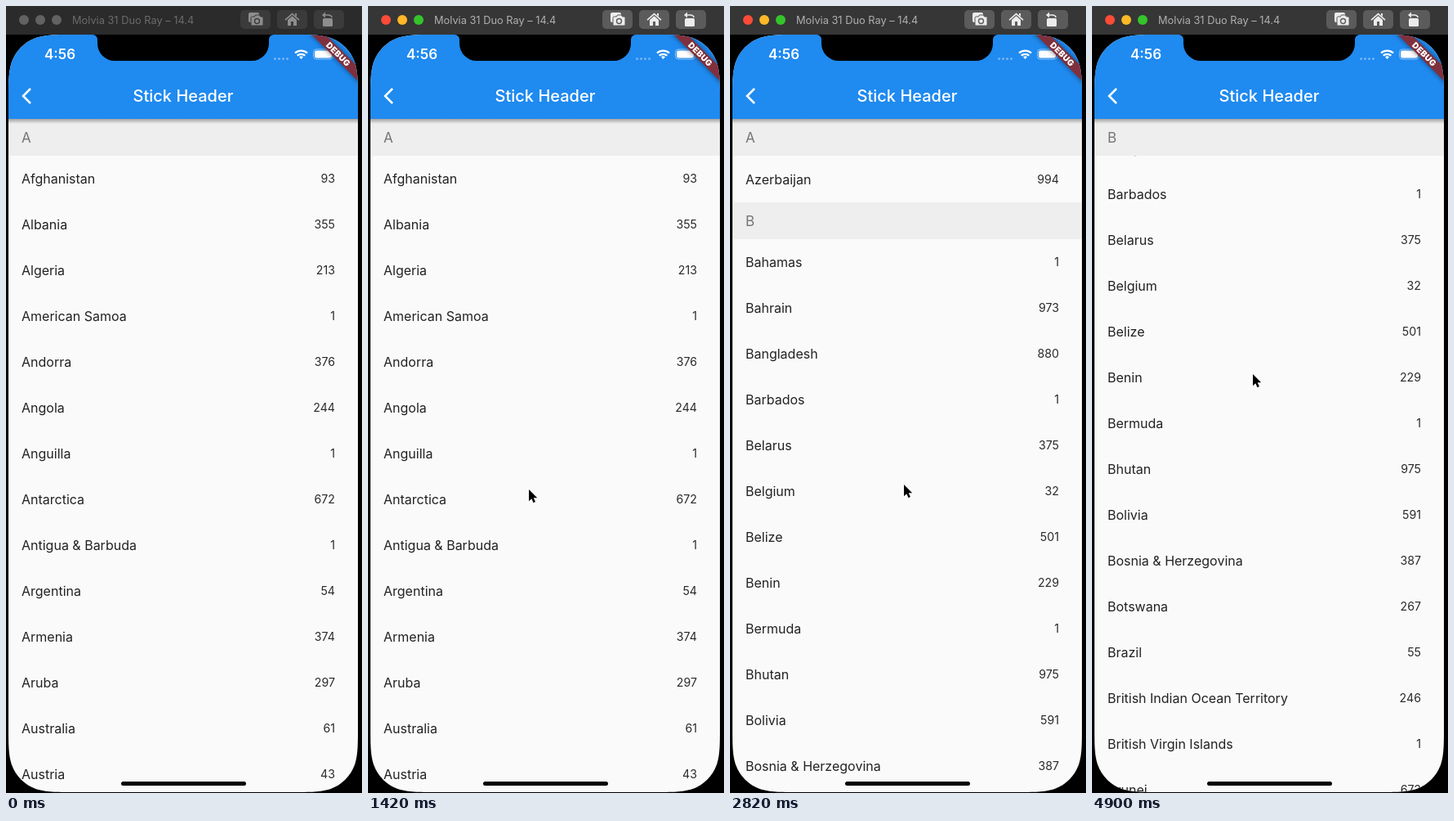
Recreate the animation shown at these times as an HTML page. Size 436x962 px, loop 4920 ms.

```html
<!DOCTYPE html>
<html lang="en">
<head>
<meta charset="utf-8">
<title>Stick Header</title>
<style>
html, body { margin: 0; width: 100%; height: 100%; overflow: hidden; background: #000; }
svg { display: block; width: 436px; height: 962px; font-family: Inter, "Liberation Sans", sans-serif; }
.name { font-size: 16px; fill: #222; }
.code { font-size: 14.2px; fill: #2a2a2a; text-anchor: end; }
.letter { font-size: 17px; fill: #757575; }
#bar { --bg: #363636; --btn: #5b5b5b; --icon: #ececec; --title: #b0b0b0; --r: #fc4b37; --y: #fdb827; --g: #35c42c; }
#bar.idle { --bg: #2b2b2b; --btn: #3b3b3b; --icon: #8e8e8e; --title: #6b6b6b; --r: #626262; --y: #626262; --g: #626262; }
#band { filter: drop-shadow(0 0 3px rgba(0, 0, 0, .5)); }
</style>
</head>
<body>
<svg viewBox="0 0 436 962">
  <defs>
    <clipPath id="screen"><path id="outline"/></clipPath>
    <linearGradient id="shade" x2="0" y2="1">
      <stop stop-color="#000" stop-opacity=".32"/>
      <stop offset="1" stop-color="#000" stop-opacity="0"/>
    </linearGradient>
  </defs>
  <rect width="436" height="962" fill="#000"/>

  <g id="bar" class="idle">
    <rect width="436" height="35" style="fill:var(--bg)"/>
    <circle cx="22" cy="17" r="6" style="fill:var(--r)"/>
    <circle cx="42" cy="17" r="6" style="fill:var(--y)"/>
    <circle cx="62" cy="17" r="6" style="fill:var(--g)"/>
    <text x="81" y="22" font-size="12.8" style="fill:var(--title)">Molvia 31 Duo Ray – 14.4</text>
    <g style="fill:var(--btn)">
      <rect x="287" y="5" width="37" height="23" rx="5"/>
      <rect x="332" y="5" width="37" height="23" rx="5"/>
      <rect x="377" y="5" width="37" height="23" rx="5"/>
    </g>
    <g style="fill:var(--icon)">
      <rect x="297" y="8" width="13" height="12" rx="2"/>
      <path d="M301.500 13h3l1-2h5l1 2h2q1.500 0 1.500 1.500v8q0 1.500-1.500 1.500h-12q-1.500 0-1.500-1.500v-8q0-1.500 1.500-1.500z" style="stroke:var(--btn)"/>
      <circle cx="307.500" cy="18.500" r="3" style="fill:none;stroke:var(--btn);stroke-width:1.400"/>
      <path d="M350.500 8.500l9 8-1 1.200-8-7-8 7-1-1.200z M345 17l5.500-4.800 5.500 4.800v7h-4v-5h-3v5h-4z M354 9h2v4l-2-2z"/>
      <rect x="388" y="15" width="12" height="10" rx="1.500"/>
      <path d="M391 7.500v7l-4-3.500z"/>
      <path d="M390 11h4q5 0 5 3" style="fill:none;stroke:var(--icon);stroke-width:1.600"/>
    </g>
  </g>

  <g clip-path="url(#screen)">
    <rect y="35" width="436" height="927" fill="#fafafa"/>
    <g id="list"></g>
    <g id="heads"></g>
    <rect y="138" width="436" height="6" fill="url(#shade)"/>
    <rect y="35" width="436" height="103" fill="#1f8af0"/>
    <path d="M106 35a6 6 0 0 1 6 6v5a21 21 0 0 0 21 21h168a21 21 0 0 0 21-21v-5a6 6 0 0 1 6-6z" fill="#000"/>
    <text x="47" y="65" font-size="17" font-weight="600" fill="#fff">4:56</text>
    <g fill="#74b5f5">
      <circle cx="329.500" cy="64.500" r="1.500"/><circle cx="334.500" cy="64.500" r="1.500"/>
      <circle cx="339.500" cy="64.500" r="1.500"/><circle cx="344.500" cy="64.500" r="1.500"/>
    </g>
    <g fill="none" stroke="#fff" stroke-width="2.300">
      <path d="M354 57.500a11 11 0 0 1 15 0M356.700 60.700a7 7 0 0 1 9.600 0"/>
      <path d="M359 62.200q2.500-1.800 5 0l-2.500 2.800z" fill="#fff" stroke="none"/>
    </g>
    <rect x="376.500" y="53" width="24" height="12" rx="3.500" fill="none" stroke="#8fc4f7"/>
    <rect x="378" y="54.500" width="21" height="9" rx="2.200" fill="#fff"/>
    <g transform="translate(431 35) rotate(45)">
      <rect id="band" x="-60" y="28" width="120" height="12" fill="#80303c"/>
      <text y="37.600" font-size="10.200" font-weight="900" letter-spacing=".3" text-anchor="middle" fill="#fff">DEBUG</text>
    </g>
    <path d="M30 101l-9 9 9 9" fill="none" stroke="#fff" stroke-width="2.600"/>
    <text x="217" y="117" font-size="20" font-weight="500" text-anchor="middle" fill="#fff">Stick Header</text>
    <rect x="141" y="948" width="153" height="5" rx="2.500" fill="#000"/>
  </g>
  <path id="cursor" d="M0 0V14.300L3.300 11.200 5.500 16.200 7.900 15.100 5.700 10.300H10.200Z" fill="#000" stroke="#fff" stroke-width="1" paint-order="stroke"/>
</svg>
<script>
const TOP = 138, HEAD = 45, ROW = 56, LOOP = 4920;
const data = {
  A: "Afghanistan:93|Albania:355|Algeria:213|American Samoa:1|Andorra:376|Angola:244|Anguilla:1|" +
     "Antarctica:672|Antigua &amp; Barbuda:1|Argentina:54|Armenia:374|Aruba:297|Australia:61|Austria:43|Azerbaijan:994",
  B: "Bahamas:1|Bahrain:973|Bangladesh:880|Barbados:1|Belarus:375|Belgium:32|Belize:501|Benin:229|" +
     "Bermuda:1|Bhutan:975|Bolivia:591|Bosnia &amp; Herzegovina:387|Botswana:267|Brazil:55|" +
     "British Indian Ocean Territory:246|British Virgin Islands:1|Brunei:673"
};
const $ = id => document.getElementById(id);

// Rounded screen with continuous corners
const bend = [[1.53, 0], [1.09, 0], [.87, 0], [.63, .075], [.37, .17], [.17, .37], [.075, .63], [0, .87], [0, 1.09], [0, 1.53]];
function corner(x, y, sx, sy) {
  const points = bend.map(([a, b]) => `${x + sx * a * 53} ${y + sy * b * 53}`);
  if (sx === sy) points.reverse();
  return `L${points[0]} C${points.slice(1).join(" ")}`;
}
const outline = corner(3, 35, 1, 1) + corner(431, 35, -1, 1) + corner(431, 961, -1, -1) + corner(3, 961, 1, -1);
$("outline").setAttribute("d", outline.replace("L", "M") + "Z");

let y = TOP, rows = "", heads = "";
const sections = Object.entries(data).map(([letter, text]) => {
  const top = y;
  y += HEAD;
  for (const item of text.split("|")) {
    const [name, code] = item.split(":");
    rows += `<text class="name" x="19" y="${y + 33.7}">${name}</text><text class="code" x="403" y="${y + 33}">${code}</text>`;
    y += ROW;
  }
  heads += `<g><rect width="436" height="${HEAD}" fill="#eee"/><text class="letter" x="19" y="29">${letter}</text></g>`;
  return { top, bottom: y };
});
$("list").innerHTML = rows;
$("heads").innerHTML = heads;

// Keys: [step, value]
const scrollKeys = [[4, 0], [23, -103], [31, 0], [38, 169], [49, 493.5], [61, 783], [79, 995.5], [93, 1034]];
const cursorX = [[0, 440], [5, 200], [23, 190], [38, 206], [49, 214], [61, 213], [79, 208], [105, 197]];
const cursorY = [[0, 300], [5, 418], [23, 658], [38, 491], [43, 420], [49, 534], [55, 470], [61, 585], [79, 381], [100, 450]];

// Monotone cubic through the keys
function curve(keys, n) {
  const last = keys.length - 1;
  if (n <= keys[0][0]) return keys[0][1];
  if (n >= keys[last][0]) return keys[last][1];
  const slope = i => (keys[i + 1][1] - keys[i][1]) / (keys[i + 1][0] - keys[i][0]);
  const tangent = i => {
    if (i === 0 || i === last) return 0;
    const a = slope(i - 1), b = slope(i);
    return a * b > 0 ? 2 * a * b / (a + b) : 0;
  };
  const i = keys.findIndex(k => k[0] > n) - 1;
  const [x0, v0] = keys[i], [x1, v1] = keys[i + 1];
  const w = x1 - x0, u = (n - x0) / w, q = 1 - u;
  return v0 * (1 + 2 * u) * q * q + v1 * u * u * (3 - 2 * u) +
    w * u * q * (tangent(i) * q - tangent(i + 1) * u);
}

function stepAt(t) {
  const r = t % 140;
  return 3 * Math.floor(t / 140) + (r >= 120 ? 2 : r >= 20 ? 1 : 0);
}

function draw(t) {
  const n = stepAt(t), scroll = curve(scrollKeys, n);
  $("list").setAttribute("transform", `translate(0 ${-scroll})`);
  sections.forEach((s, i) => {
    const top = s.top - scroll;
    const pos = top >= TOP ? top : Math.min(TOP, s.bottom - scroll - HEAD);
    $("heads").children[i].setAttribute("transform", `translate(0 ${pos})`);
  });
  $("bar").setAttribute("class", n < 5 ? "idle" : "");
  $("cursor").setAttribute("transform", `translate(${curve(cursorX, n)} ${curve(cursorY, n)})`);
}

const start = performance.now();
function tick() {
  draw((performance.now() - start) % LOOP);
  requestAnimationFrame(tick);
}
tick();
</script>
</body>
</html>
```
